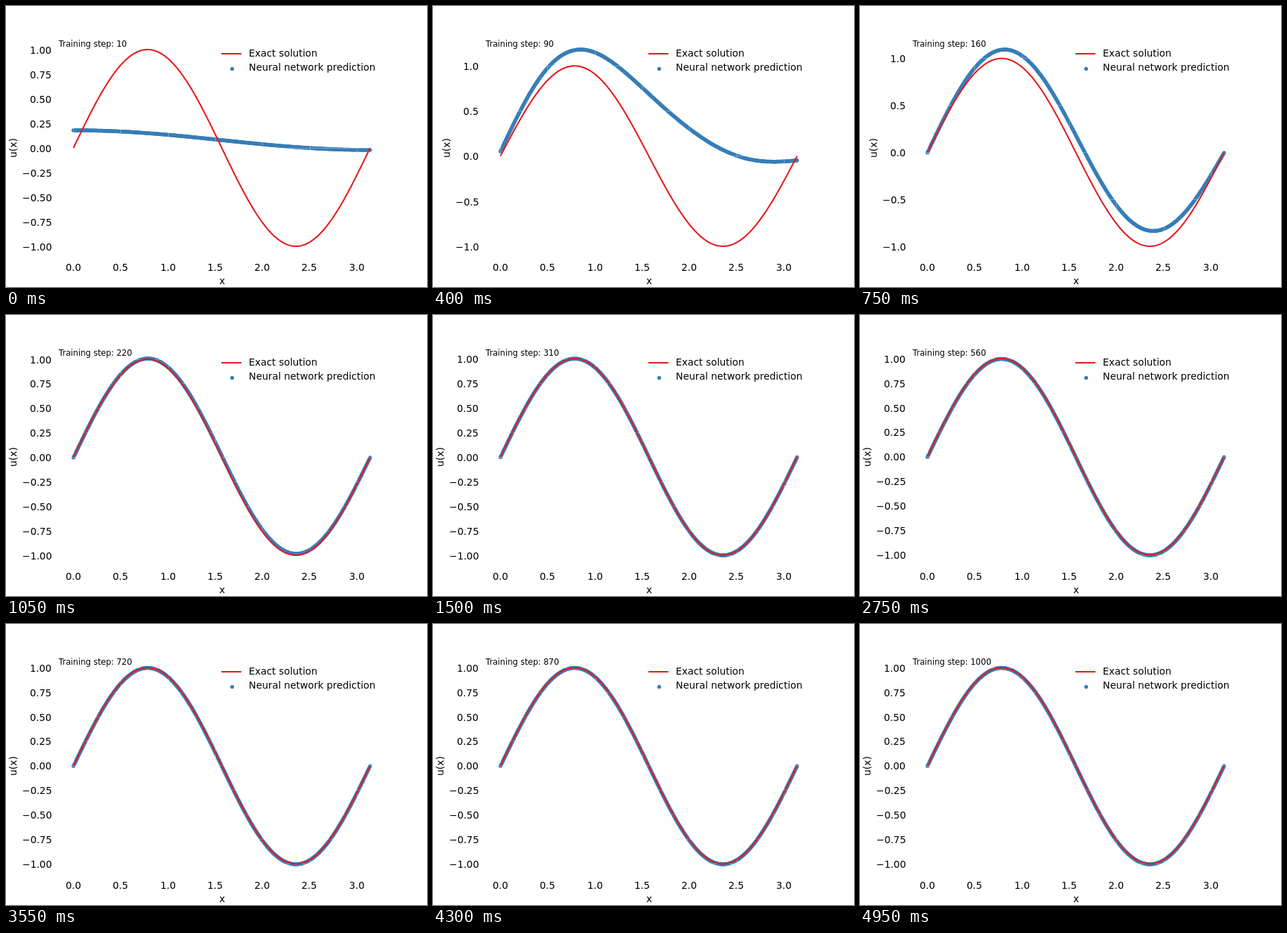
Write an HTML page with a canvas that moves like this. It is 600x400 px and loops after 5000 ms.

```html
<!DOCTYPE html>
<html lang="en">
<head>
<meta charset="utf-8">
<title>Network training</title>
<style>
html, body { margin: 0; height: 100%; overflow: hidden; background: #fff; }
canvas { display: block; }
</style>
</head>
<body>
<canvas id="plot" width="600" height="400"></canvas>
<script>
const ctx = document.getElementById('plot').getContext('2d');
const RED = '#e41a1c', BLUE = '#377eb8', GRID = 'rgba(255,255,255,.3)';
const LEFT = 96.14, SCALE_X = 422.72 / Math.PI, TOP = 62, BOTTOM = 342;
const STEP_MS = 50, STEPS = 100, POINTS = 400;
const { sin, cos, exp, round } = Math;

const xs = Array.from({ length: POINTS }, (_, i) => i * Math.PI / (POINTS - 1));
const toX = x => LEFT + x * SCALE_X;
const logistic = v => 1 / (1 + exp(-v));

// The network learns one broad hump first, which then gives way to sin(2x)
function predictionAt(t) {
  const rise = 1 - exp(-t / 185);
  const hump = rise * (.72 * logistic((692 - t) / 40) + .6 * exp(-t / 310));
  const wave = rise * logistic((t - 366) / 98.6);
  const ripple = exp(-(((t - 400) / 80) ** 2));
  const tilt = .1 * exp(-((t / 452) ** 3));
  const offset = .083 * exp(-t / 150) - .004;
  return x => offset + tilt * cos(x) + hump * sin(x) + wave * sin(2 * x)
    + ripple * (.094 * sin(3 * x) + .03 * sin(4 * x));
}

// Text starts on whole pixels; align is the share of its width left of x
function text(str, x, y, align = 0, size = 13.89) {
  ctx.font = size + 'px "DejaVu Sans", sans-serif';
  ctx.fillStyle = '#000';
  ctx.fillText(str, round(x - align * ctx.measureText(str).width), y);
}

function dot(x, y) {
  ctx.beginPath();
  ctx.arc(x, y, 2.75, 0, 2 * Math.PI);
  ctx.fillStyle = BLUE;
  ctx.fill();
}

function line(points) {
  ctx.beginPath();
  points.forEach(([x, y]) => ctx.lineTo(x, y));
  ctx.strokeStyle = RED;
  ctx.lineWidth = 2.08;
  ctx.stroke();
}

function legend(dx, dy) {
  ctx.save();
  ctx.translate(dx, dy);
  line([[307, 68], [335.5, 68]]);
  dot(322.3, 89.4);
  text('Exact solution', 346, 72);
  text('Neural network prediction', 346, 92);
  ctx.restore();
}

function draw(step) {
  const guess = xs.map(predictionAt(step * STEP_MS));
  const high = Math.max(1, ...guess), low = Math.min(-1, ...guess), range = high - low;
  const toY = u => TOP + (high - u) / range * (BOTTOM - TOP);
  const fine = range * 1.1 / 9 <= .25, tick = fine ? .25 : .5, margin = range * .05;

  ctx.fillStyle = '#fff';
  ctx.fillRect(0, 0, 600, 400);
  const dots = xs.map((x, i) => [toX(x), toY(guess[i])]);
  dots.forEach(([x, y]) => dot(x, y));

  // White grid lines only show where they cross the dots
  for (let x = 0; x <= 3; x += .5) {
    ctx.fillStyle = GRID;
    ctx.fillRect(round(toX(x)), 48, 1, 308);
    text(x.toFixed(1), toX(x), 377, .5);
  }
  for (let u = Math.ceil((low - margin) / tick) * tick; u <= high + margin; u += tick) {
    const y = Math.floor(toY(u) + .2);
    ctx.fillStyle = GRID;
    ctx.fillRect(75, y, 465, 1);
    text((u < 0 ? '\u2212' : '') + Math.abs(u).toFixed(fine ? 2 : 1), 65.3, y + 6, 1);
  }

  line(xs.map(x => [toX(x), toY(sin(2 * x))]));
  text('x', 308, 396, .5);
  ctx.save();
  ctx.translate(fine ? 15 : 24, 202);
  ctx.rotate(-Math.PI / 2);
  text('u(x)', 0, 0, .5);
  ctx.restore();
  text('Training step: ' + 10 * (step + 1), 75, 58, 0, 11.65);

  // The legend moves to the lower left while dots would run under it
  const blocked = dots.some(([x, y]) => x > 302 && y < 98);
  legend(blocked ? -220 : 0, blocked ? 248 : 0);
}

function frame() {
  draw(Math.floor(performance.now() / STEP_MS) % STEPS);
  requestAnimationFrame(frame);
}
frame();
</script>
</body>
</html>
```
